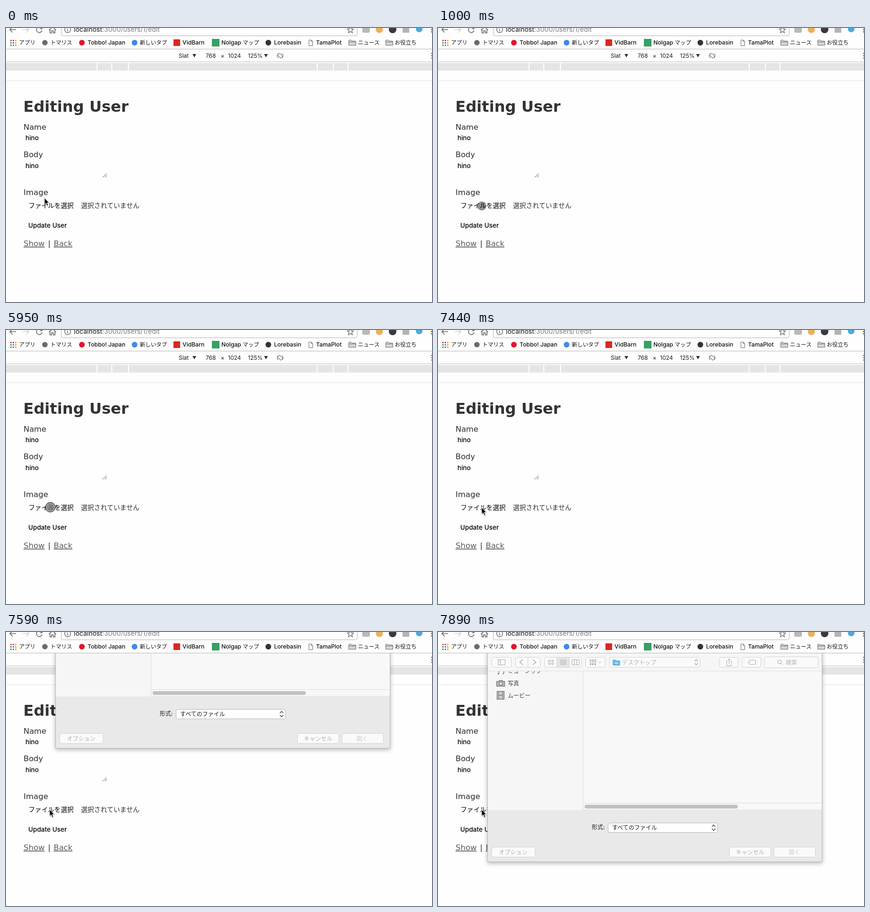
These frames come from a looping animation (898 by 579 pixels, 8000 ms). An HTML page:

```html
<!DOCTYPE html>
<html lang="ja">
<head>
<meta charset="utf-8">
<title>Editing User</title>
<style>
html, body { margin: 0; width: 100%; height: 100%; overflow: hidden; background: #fefefe; }
svg { display: block; font: 500 12px Inter, "Noto Sans CJK JP", "Noto Sans CJK", sans-serif; fill: #1a1a1a; }
text { white-space: pre; }
.marks text { font-size: 12.2px; fill: #111; }
.marks .ja { font-size: 11.5px; }
.page { font: 16.25px "DejaVu Sans", sans-serif; fill: #2b2b2b; }
.page a { fill: #5c5c5c; text-decoration: underline; }
.field { font: 500 13.6px Inter, "Noto Sans CJK JP", "Noto Sans CJK", sans-serif; fill: #000; }
.line { fill: none; stroke: #666; stroke-width: 1.6; }
.box { fill: #fafafa; stroke: #d2d2d2; }
.thin { fill: none; stroke: #a8a8a8; }
.dim { fill: #b0b0b0; }
</style>
</head>
<body>
<svg width="898" height="579" viewBox="0 0 898 579">
  <defs>
    <clipPath id="below"><path d="M0 45H898V579H0Z"/></clipPath>
    <g id="folder" fill="#d4d4d4" stroke="#6c6c6c">
      <path d="M.5 11.5V1.5Q.5.5 1.5.5H5.5L7 2.5H14Q15.5 2.5 15.5 4V11.5Z"/>
      <path d="M.5 4.5H15.5"/>
    </g>
    <path id="updown" d="M0 4L3.5 0L7 4M0 8L3.5 12L7 8" fill="none" stroke-width="1.4"/>
  </defs>

  <!-- address row -->
  <g class="line">
    <path d="M21 3.5H8M14-2.5L8 3.5L14 9.5"/>
    <path d="M35 3.5H48M42-2.5L48 3.5L42 9.5" stroke="#d2d2d2"/>
    <path d="M75.5 1A6 6 0 1 0 76 5M76-3V1.5H71.5"/>
    <path d="M90.5 4.5L98-2.5L105.5 4.5M92.8 3.5V10.5H96.3V6H99.7V10.5H103.2V3.5"/>
    <path d="M116.5-2V12.5Q116.5 16.5 120.5 16.5H736.5Q740.5 16.5 740.5 12.5V-2" stroke="#b2b2b2" stroke-width="1"/>
    <circle cx="130" cy="3.5" r="6.3" stroke-width="1.4"/>
    <path d="M130 2.5V7M130-.5V1"/>
    <path d="M726-3L728 1.7L732.5 2L729 5.3L730.2 10L726 7.4L721.8 10L723 5.3L719.5 2L724 1.7Z" stroke-width="1.3"/>
  </g>
  <text x="143" y="8" font-size="14" font-weight="400">localhost<tspan fill="#808080">:3000/users/1/edit</tspan></text>
  <rect x="751" y="-5" width="16" height="15" rx="3" fill="#b9b9b9"/>
  <circle cx="787" cy="3" r="7.5" fill="#e8b15c"/>
  <circle cx="815" cy="3" r="8" fill="#3c3840"/>
  <rect x="836" y="-4" width="14" height="14" fill="#b3b3b3"/>
  <circle cx="871" cy="2" r="7" fill="#4fa9dc"/>
  <g fill="#666"><circle cx="897.5" cy="3" r="1.6"/><circle cx="897.5" cy="8" r="1.6"/></g>

  <!-- bookmarks -->
  <g class="marks">
    <g id="apps"></g>
    <circle cx="82" cy="31" r="5.8" fill="#6b6b6b"/>
    <circle cx="160" cy="31" r="6" fill="#e5132c"/>
    <circle cx="271" cy="31" r="6" fill="#4285f4"/>
    <rect x="353" y="24" width="14" height="14" fill="#dd2620"/>
    <rect x="434" y="23" width="16" height="16" fill="#35a162"/>
    <circle cx="553" cy="31" r="6" fill="#333"/>
    <path d="M638.5 25.5H643.5L646.5 28.5V37.5H638.5ZM643.5 25.5V28.5H646.5" fill="#fff" stroke="#666"/>
    <use href="#folder" x="722" y="25"/>
    <use href="#folder" x="800" y="25"/>
    <text class="ja" x="27.5" y="35">アプリ</text>
    <text class="ja" x="93.5" y="35">トマリス</text>
    <text x="172" y="35">Tobbo! Japan</text>
    <text class="ja" x="282" y="35">新しいタブ</text>
    <text x="372" y="35">VidBarn</text>
    <text x="454" y="35">Nolgap <tspan class="ja">マップ</tspan></text>
    <text x="565" y="35">Lorebasin</text>
    <text x="653.5" y="35">TamaPlot</text>
    <text class="ja" x="742" y="35">ニュース</text>
    <text class="ja" x="819.5" y="35">お役立ち</text>
  </g>
  <path d="M0 44.5H898" stroke="#b4b4b4"/>

  <!-- device bar -->
  <g font-weight="400">
    <text x="364" y="63">Slat</text>
    <text x="421" y="63">768</text>
    <text x="452.5" y="63">×</text>
    <text x="468" y="63">1024</text>
    <text x="510" y="63">125%</text>
  </g>
  <path d="M393 55H401L397 62ZM544 55H552L548 62Z" fill="#333"/>
  <g transform="translate(578 58.5) rotate(-45)" fill="none" stroke="#666">
    <rect x="-3" y="-5" width="6" height="10" rx="1"/>
    <path d="M-6.2 1A6.2 6.2 0 0 1 0-6.2M6.2-1A6.2 6.2 0 0 1 0 6.2"/>
  </g>
  <g fill="#666"><circle cx="897.5" cy="53.5" r="1.3"/><circle cx="897.5" cy="58.5" r="1.3"/><circle cx="897.5" cy="63.5" r="1.3"/></g>
  <path d="M0 71.5H898" stroke="#bebebe"/>
  <path d="M0 74H898V90H0Z" fill="#e5e5e5"/>
  <path d="M192 74V90M223 74V90M258 74V90M656 74V90M690 74V90M721 74V90" stroke="#fff" stroke-width="2"/>
  <path d="M0 111.5H898" stroke="#e4e4e4"/>

  <!-- form -->
  <g class="page">
    <text x="36.5" y="177" font-size="32.1" font-weight="bold" fill="#333">Editing User</text>
    <text x="37" y="215">Name</text>
    <text x="37" y="273">Body</text>
    <text x="37" y="353" font-size="16.6">Image</text>
    <text x="37" y="461" font-size="16.5"><a>Show</a></text>
    <text x="88.5" y="461">|</text>
    <text x="100.5" y="461"><a>Back</a></text>
  </g>
  <g class="field">
    <text x="41" y="237">hino</text>
    <text x="41" y="296">hino</text>
    <text x="47.5" y="380">ファイルを選択</text>
    <text x="158" y="380" font-size="13.8" fill="#2b2b2b">選択されていません</text>
    <text x="47" y="422">Update User</text>
  </g>
  <path d="M204 315.5L212 307.5M208.5 315.5L212.5 311.5" stroke="#444"/>

  <!-- file chooser -->
  <g clip-path="url(#below)">
    <g id="sheet">
      <path d="M104.5 0H809.5V485.5H104.5Z" fill="#e9e9e9" stroke="#b8b8b8" style="filter:drop-shadow(0 3px 5px rgba(0,0,0,.28))"/>
      <path d="M105 0H305V376H105Z" fill="#f6f6f6"/>
      <path d="M306 0H809V375H306Z" fill="#f8f8f8"/>
      <path d="M305.5 82V376M306 361.5H809" stroke="#dadada"/>
      <rect x="309" y="365" width="323" height="8" rx="4" fill="#c1c1c1"/>

      <g fill="#444">
        <text x="147" y="87">ミュージック</text>
        <text x="147" y="113">写真</text>
        <text x="147" y="138.5">ムービー</text>
      </g>
      <g fill="none" stroke="#777" stroke-width="1.3">
        <path d="M128.5 88V76H139V87"/>
        <path d="M126 88.5H128M136.5 87.5H138.5" stroke-width="3"/>
        <path d="M123.5 104.5H128L129.5 102.5H135.5L137 104.5H140.5V114.5H123.5Z" fill="#b5b5b5"/>
        <circle cx="132.5" cy="109" r="3.2" fill="#eee"/>
        <path d="M124.5 125.5H139.5V142H124.5ZM127.5 125.5V142M136.5 125.5V142M127.5 133.5H136.5" fill="#ccc"/>
      </g>

      <path d="M105 0H809V82H105Z" fill="#f6f6f6"/>
      <path d="M105 82.5H809" stroke="#dfdfdf"/>
      <g class="box">
        <rect x="113.5" y="53.5" width="41" height="21" rx="3"/>
        <rect x="163.5" y="53.5" width="52" height="21" rx="3"/>
        <rect x="224.5" y="53.5" width="78" height="21" rx="3"/>
        <rect x="311.5" y="53.5" width="41" height="21" rx="3"/>
        <rect x="361.5" y="53.5" width="191" height="21" rx="3"/>
        <rect x="593.5" y="53.5" width="39" height="21" rx="3"/>
        <rect x="641.5" y="53.5" width="39" height="21" rx="3"/>
        <rect x="688.5" y="52.5" width="113" height="23" rx="3"/>
        <path d="M251 54H276V74H251Z" fill="#e6e6e6" stroke="none"/>
        <path d="M189.5 54V74M250.5 54V74M276.5 54V74"/>
      </g>
      <g class="thin">
        <path d="M126.5 58.5H141.5V69.5H126.5ZM131.5 58.5V69.5M128 61.5H130M128 64.5H130"/>
        <path d="M179 58.5L172.5 64L179 69.5M200 58.5L206.5 64L200 69.5" stroke-width="1.4"/>
        <path d="M232.5 59.5H236.5V62.5H232.5ZM239.5 59.5H243.5V62.5H239.5ZM232.5 65.5H236.5V68.5H232.5ZM239.5 65.5H243.5V68.5H239.5Z"/>
        <path d="M257 59.5H271M257 62.5H271M257 65.5H271M257 68.5H271"/>
        <path d="M282.5 58.5H297.5V69.5H282.5ZM287.5 58.5V69.5M292.5 58.5V69.5"/>
        <path d="M319 58.5H334M319 65.5H334"/>
        <path d="M320 61.5H334M320 68.5H334" stroke-width="3" stroke-dasharray="3 2"/>
        <path d="M338 62.5L341 65.5L344 62.5"/>
        <path d="M611 61.5H608.5V71.5H618.5V61.5H616M613.5 67V56.5M610.5 59.5L613.5 56.5L616.5 59.5"/>
        <path d="M653.5 64L657 59.5H668.5Q669.5 59.5 669.5 61V67Q669.5 68.5 668.5 68.5H657Z"/>
        <circle cx="657.5" cy="64" r=".8"/>
        <circle cx="720" cy="63" r="4"/><path d="M723 66L727 70"/>
      </g>
      <path d="M368 58H374L375.5 60H384V71H368Z" fill="#72bfe9"/>
      <path d="M371.5 63.5H380.5V68.5H371.5Z" fill="#a9dbf5" stroke="#4d9fce"/>
      <use href="#updown" x="541" y="58" stroke="#a8a8a8"/>
      <text class="dim" x="388" y="68.5">デスクトップ</text>
      <text class="dim" x="733" y="68.5">検索</text>

      <g class="box">
        <rect x="358.5" y="403.5" width="231" height="20" rx="3.5" fill="#fff" style="stroke:#b5b5b5"/>
        <rect x="113.5" y="454.5" width="91" height="21" rx="3"/>
        <rect x="614.5" y="454.5" width="87" height="21" rx="3"/>
        <rect x="708.5" y="454.5" width="87" height="21" rx="3"/>
      </g>
      <use href="#updown" x="577.5" y="407.5" stroke="#444"/>
      <text x="324" y="417">形式:</text>
      <text x="367" y="417.5">すべてのファイル</text>
      <text class="dim" x="128.5" y="469.5">オプション</text>
      <text class="dim" x="628" y="469.5">キャンセル</text>
      <text x="739" y="469.5" fill="#ccc">開く</text>
    </g>
  </g>

  <!-- pointer -->
  <path id="arrow" d="M0 0V14.2L3.2 11.2L5.7 16.8L8 15.8L5.6 10.4H10Z" fill="#000" stroke="#fff" style="filter:drop-shadow(0 1px 1px rgba(0,0,0,.35))"/>
  <circle id="dot" cx="92.5" cy="376" r="9.5" fill="#000" fill-opacity=".44"/>
  <g id="ring">
    <circle cx="93.5" cy="374.5" r="10" fill="#fff" fill-opacity=".7" stroke="#333" stroke-width="1.3"/>
    <circle cx="93.5" cy="374.5" r="8.5" fill="#000" fill-opacity=".46"/>
  </g>
</svg>
<script>
const el = id => document.getElementById(id);
const place = (id, x, y) => el(id).setAttribute("transform", `translate(${x} ${y})`);
const show = (id, on) => el(id).style.display = on ? "" : "none";
const within = (t, from, to) => t >= from && t < to;
const latest = (steps, t) => steps.findLast(s => s[0] <= t);

const colors = ["#e2473b", "#e2473b", "#e9a03b", "#42a35a", "#4886e0", "#e9a03b", "#42a35a", "#4886e0", "#e9a03b"];
el("apps").innerHTML = colors.map((c, i) =>
  `<rect x="${9 + i % 3 * 5}" y="${25 + Math.floor(i / 3) * 5}" width="3" height="3" fill="${c}"/>`).join("");

// [start time, x, y]
const pointer = [[0, 81, 359], [270, 86, 364], [410, 88, 367], [560, 91, 372], [710, 92, 375]];
const slide = [[0, 0, -600], [7590, 0, -240], [7740, 0, -10], [7890, 0, 0]];

function draw(now) {
  const t = now % 8000;
  const pressed = within(t, 860, 7440);
  const ringed = within(t, 860, 1000) || within(t, 5950, 6100);
  const [, px, py] = latest(pointer, t);
  const [, sx, sy] = latest(slide, t);
  place("arrow", px, py);
  place("sheet", sx, sy);
  show("sheet", t >= 7590);
  show("arrow", !pressed);
  show("dot", pressed && !ringed);
  show("ring", ringed);
  requestAnimationFrame(draw);
}
draw(performance.now());
</script>
</body>
</html>
```
